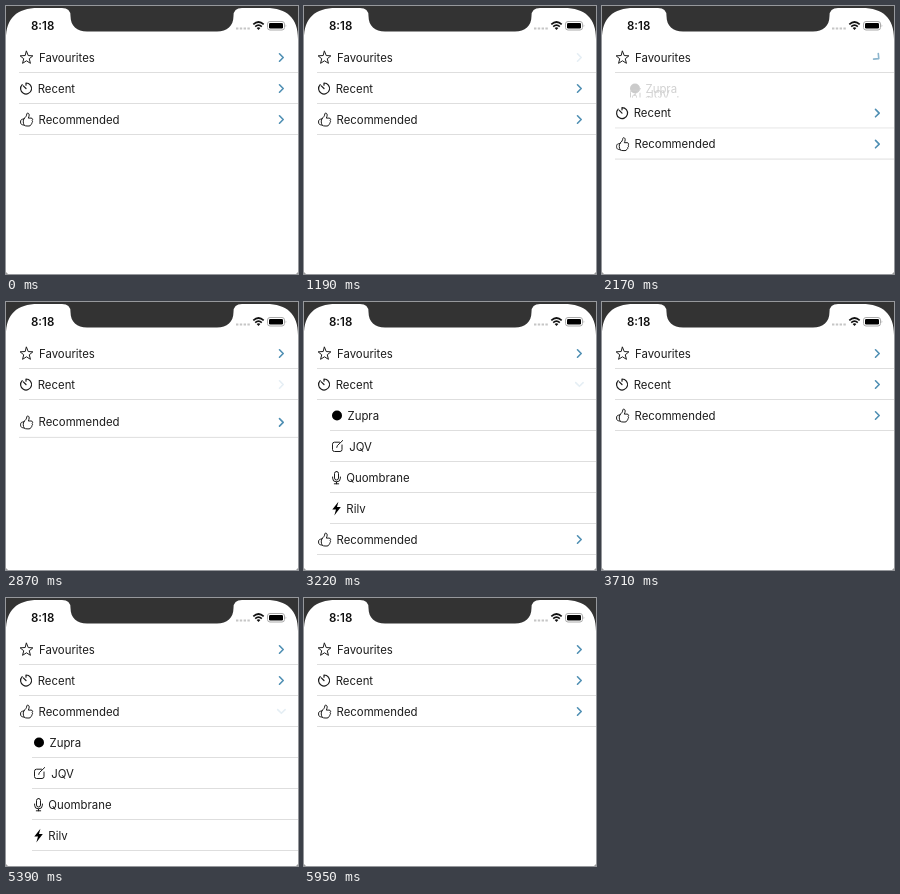
An HTML page that plays this animation: 292 px wide and 268 px high, repeating every 6.58 s.

```html
<!DOCTYPE html>
<html lang="en">
<head>
<meta charset="utf-8">
<title>Expanding list</title>
<style>
  html, body { margin: 0; width: 100%; height: 100%; overflow: hidden; background: #fff; }
  svg { display: block; width: 292px; height: 268px; }
  text { font: 11.4px Inter, Roboto, sans-serif; fill: #1c1c1c; }
  .time { font-size: 11.5px; font-weight: 600; fill: #111; }
  .icon { fill: none; stroke: #1c1c1c; stroke-width: 1; stroke-linejoin: round; stroke-linecap: round; }
  .solid { fill: #000; stroke: none; }
  .rule { stroke: #dedede; }
  .chevron { fill: none; stroke: #4f8fb3; stroke-width: 1.6; stroke-linecap: round; stroke-linejoin: round; }
</style>
</head>
<body>
<svg viewBox="0 0 292 268">
  <g id="list"></g>
  <path fill="#333" d="M0 0H292V33C292 12 281 2 260 2H236Q227.500 2 227.500 10C227.500 20 221 25.500 211 25.500H81C71 25.500 64.500 20 64.500 10Q64.500 2 56 2H32C11 2 0 12 0 33Z"/>
  <path fill="#999" d="M0 266v2h2zM292 266v2h-2z"/>
  <text class="time" x="25" y="23.500">8:18</text>
  <path stroke="#c6c6c6" stroke-width="2" stroke-dasharray="2.400 1.400" d="M230 22.500h14"/>
  <g fill="none" stroke="#111" stroke-width="1.700">
    <path d="M247.300 18.300Q252.500 13.700 257.700 18.300M249.200 20.600Q252.500 17.700 255.800 20.600"/>
    <path fill="#111" stroke="none" d="M250.600 21.900Q252.500 20.400 254.400 21.900L252.500 24Z"/>
  </g>
  <rect x="261.500" y="15.500" width="17" height="8.500" rx="2.500" fill="none" stroke="#aaa"/>
  <rect x="263" y="17" width="14" height="5.500" rx="1.300"/>
  <path d="M279.700 18.300q1.300 1.500 0 3z" fill="#999"/>
</svg>
<script>
const LOOP = 6580, STEP = 70, ROW = 31, TOP = 51.5, SLIDE = 350, LAG = 60;

const star = Array.from({ length: 10 }, (_, i) => {
  const a = i * Math.PI / 5, r = i % 2 ? 2.9 : 6.7;
  return `${20.5 + r * Math.sin(a)} ${0.4 - r * Math.cos(a)}`;
}).join('L');

const sections = [
  ['Favourites', 33, `<path d="M${star}Z"/>`],
  ['Recent', 31.7, '<path d="M16.200 -3.900A5.500 5.500 0 1 0 20 -5.500V-3.300M20 0L17.300 -2.700" stroke-width="1.200"/>'],
  ['Recommended', 32.5, `<path d="M18 -.8C20 -2.500 20.600 -3.800 20.800 -5.600
    C21 -7 23.200 -6.600 23.200 -4.400C23.200 -3 22.500 -2.200 22.300 -1.400H25
    C27 -1.400 27 .6 26 1C27 1.800 26.500 3.200 25.700 3.400C26 4.500 25.300 5.200 24.700 5.300
    C24.600 6.200 24 6.500 23 6.500H21C18.500 6.500 17.800 5.300 16.500 5.300
    C14 5.300 13.800 -.3 16.500 -.3C17.200 -.3 17.500 -.4 18 -.8ZM18 -.8C16.800 1 17 3.800 18.200 5.700"/>`]
];

const items = [
  ['Zupra', 43.5, '<circle class="solid" cx="33" cy="0" r="5"/>'],
  ['JQV', 45.3, '<path d="M35.500 -4.300H30.500Q28.500 -4.300 28.500 -2.300V3Q28.500 5 30.500 5H36Q38 5 38 3V-1.500M32.800 .9L33.300 -.8L38.700 -6"/>'],
  ['Quombrane', 42.3, '<rect x="30.500" y="-6" width="4" height="8.500" rx="2"/><path d="M28.600 -.5V.7A3.900 3.700 0 0 0 36.400 .7V-.5M32.500 4.400V6.300M30.300 6.300H34.700"/>'],
  ['Rilv', 42.3, '<path class="solid" d="M34.400 -6.800L28.300 1H32L30.300 7L36.800 -1.400H33Z"/>']
];

// section, moment of the press, start of the slide; each section opens, then closes
const taps = [
  [0, 1190, 1258], [0, 1820, 1920],
  [1, 2730, 2820], [1, 3220, 3300],
  [2, 4900, 4985], [2, 5390, 5500]
];

const clamp = x => Math.min(1, Math.max(0, x));
const ease = x => (x = clamp(x), x * x * (3 - 2 * x));
const move = (el, y) => el.setAttribute('transform', `translate(0 ${y})`);
const row = ([label, x, icon], indent) =>
  `<g class="icon">${icon}</g><text x="${x}" y="4">${label}</text><path class="rule" d="M${indent} 15H292"/>`;

const list = document.getElementById('list');
list.innerHTML = sections.map(s => `<g class="section">
  <rect y="-15.500" width="292" height="31" fill="#fff"/>${row(s, 13)}
  <path class="chevron" d="M273.500 -3.700L277.200 0L273.500 3.700"/>
  <g class="items">${items.map(i => `<g>${row(i, 26)}</g>`).join('')}</g></g>`).join('');

const views = [...list.children].map((el, i) => ({
  el,
  chevron: el.querySelector('.chevron'),
  items: el.querySelector('.items'),
  taps: taps.filter(t => t[0] === i)
}));

function draw(t) {
  let y = TOP;
  for (const { el, chevron, items, taps: [open, close] } of views) {
    const amount = time => ease((time - open[2]) / SLIDE) - ease((time - close[2]) / SLIDE);
    const glow = ([, press]) => t < press ? 1 : 0.15 + 0.85 * clamp((t - press - 140) / 350);
    const p = amount(t);
    move(el, y);
    chevron.setAttribute('transform', `rotate(${90 * amount(t - LAG)} 275.400 0)`);
    chevron.setAttribute('opacity', glow(open) * glow(close));
    items.setAttribute('opacity', p);
    [...items.children].forEach((item, i) => move(item, ROW * (1 + i * p)));
    y += ROW * (1 + items.children.length * p);
  }
}

const start = performance.now();
function tick() {
  const t = (performance.now() - start) % LOOP;
  draw(Math.floor(t / STEP) * STEP);
  requestAnimationFrame(tick);
}
tick();
</script>
</body>
</html>
```
